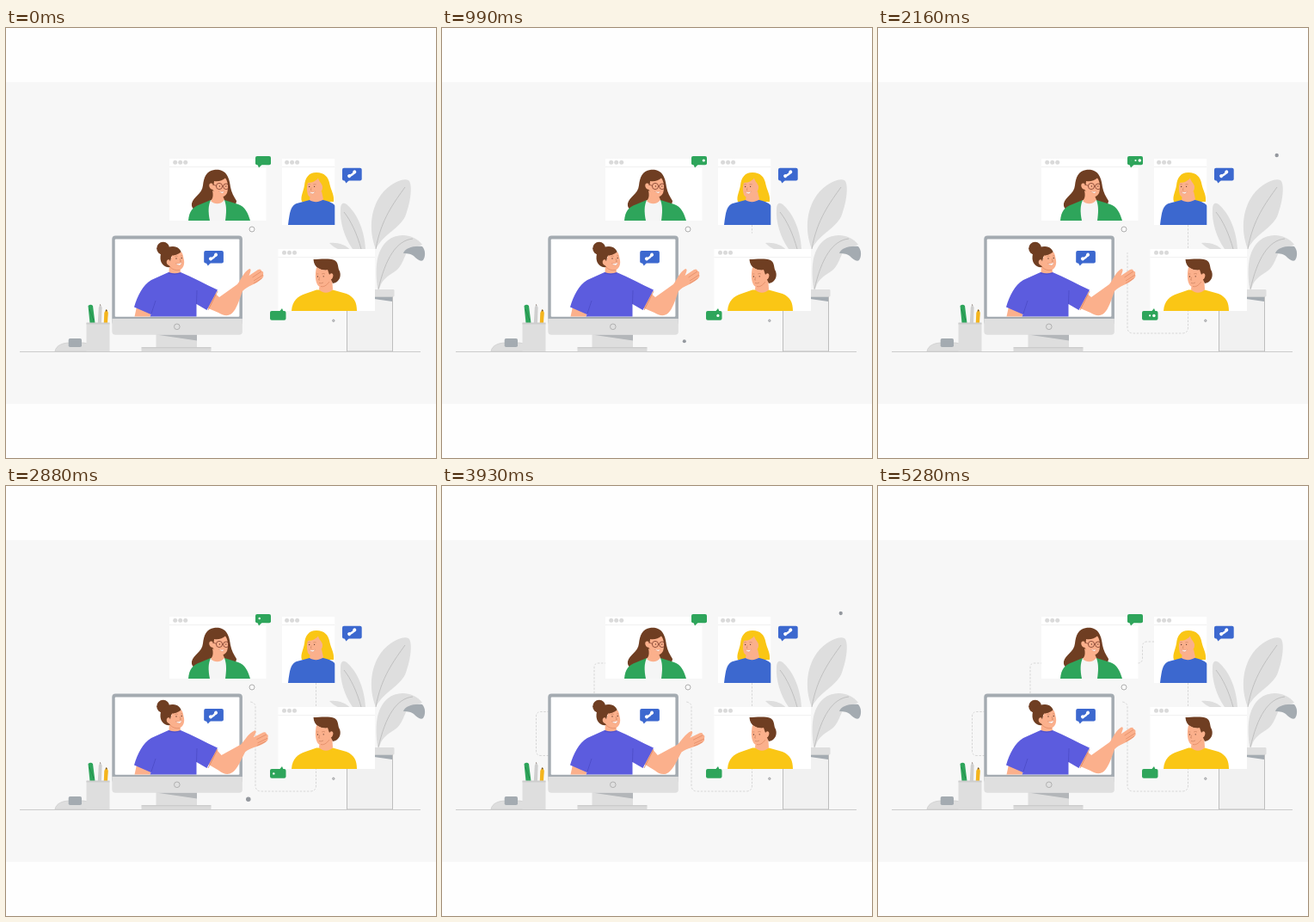
Recreate the animation shown at these times as an HTML page with a canvas. Size 500 px wide and 500 px high, loop 5430 ms.

```html
<!DOCTYPE html>
<html lang="en">
<head>
<meta charset="utf-8">
<title>Video call</title>
<style>
html, body { margin: 0; width: 100%; height: 100%; overflow: hidden; background: #fefefe; }
canvas { display: block; width: 500px; height: 500px; }
</style>
</head>
<body>
<canvas id="stage"></canvas>
<script>
const LOOP = 5430, END = 5280;
const cv = document.getElementById('stage');
const dpr = window.devicePixelRatio || 1;
cv.width = cv.height = 500 * dpr;
const c = cv.getContext('2d');

const SKIN = '#fbb08c', SKIN_LINE = '#d9805c', HAIR = '#6f3e22', GREEN = '#2ea55b',
  BLUE = '#3c68cf', YELLOW = '#fac615', VIOLET = '#5c5cde', GREY = '#dedede',
  STEEL = '#a4abb1', LINE = '#b8b8b8', WHITE = '#fff';

const clamp = x => Math.max(0, Math.min(1, x));
const smooth = x => { x = clamp(x); return x * x * (3 - 2 * x); };
const pulse = x => x > 0 && x < 1 ? Math.sin(Math.PI * x) : 0;

function shape(d, fill, line, w = 1) {
  const p = new Path2D(d);
  if (fill) { c.fillStyle = fill; c.fill(p); }
  if (line) { c.strokeStyle = line; c.lineWidth = w; c.stroke(p); }
}
function box(x, y, w, h, fill, r = 0, line) {
  c.beginPath();
  c.roundRect(x, y, w, h, r);
  if (fill) { c.fillStyle = fill; c.fill(); }
  if (line) { c.strokeStyle = line; c.lineWidth = 1; c.stroke(); }
}
function dot(x, y, r, fill, line, w = 1) {
  if (r <= 0) return;
  c.beginPath();
  c.arc(x, y, r, 0, 7);
  if (fill) { c.fillStyle = fill; c.fill(); }
  if (line) { c.strokeStyle = line; c.lineWidth = w; c.stroke(); }
}

function plant() {
  shape('M403 257C393 243 388 224 389 211C389 204 392 202 396 205C408 215 417 235 418 257Z', GREY);
  shape('M393 214C401 224 408 239 413 257', null, LINE, .8);
  shape('M376 250C386 249 395 252 400 258H388C383 256 379 253 376 250Z', GREY);
  shape('M430 257C422 237 423 212 436 194C446 181 461 174 468 177C473 181 471 201 465 217C459 233 440 238 430 257Z', GREY);
  shape('M464 185C452 202 436 222 430 257', null, LINE, .8);
  shape('M432 303C429 279 430 259 444 247C455 238 474 239 484 252L471 256C463 261 463 273 455 281C447 287 438 290 434 303Z', GREY);
  shape('M462 262C464 256 473 253 484 254C488 258 488 266 485 270C482 272 478 269 474 265C470 262 465 262 462 262Z', STEEL);
  shape('M473 245C454 247 441 268 433 304', null, LINE, .8);
  box(396.5, 312, 53, 64, '#f1f1f1', 0, '#bdbdbd');
  shape('M420 312.5H449V318L428 315Z', STEEL);
  box(392, 304, 59.5, 8.5, GREY, 1);
}

const cable = [
  // path, approximate length, start time, finish time
  ['M360.5 229V348Q360.5 355 353.5 355H297Q290 355 290 348V257Q290 252 284 251', 303, 950, 2240],
  ['M124 313.5H115Q109.5 313.5 109.5 308V268Q109.5 262.5 115 262.5H124', 75, 2950, 3280],
  ['M177 241V211Q177 206 182 206H190', 46, 3700, 3900],
  ['M302 206Q307.5 206 307.5 200V187Q307.5 181 313 181H321', 43, 4450, 4650]
];
function cables(t) {
  c.strokeStyle = '#cdcdcd';
  c.lineWidth = .8;
  for (const [d, len, a, b] of cable) {
    let left = clamp((t - a) / (b - a)) * len;
    if (left <= 0) continue;
    const dash = [];
    while (left > 0) { dash.push(Math.min(2.4, left), 1.7); left -= 4.1; }
    dash[dash.length - 1] = 2 * len;
    c.setLineDash(dash);
    c.stroke(new Path2D(d));
  }
  c.setLineDash([]);
}

function pane(x, y, w, h, dx) {
  box(x, y, w, h, WHITE);
  box(x, y + 9, w, .8, '#ececec');
  for (let i = 0; i < 3; i++) dot(x + dx + i * 6, y + 4.3, 2.5, '#dadada');
}
function eye(x, y) { dot(x, y, .65, '#5b3428'); }
function smile(d) { shape(d, WHITE, '#d5805f', .35); }

function guestGlasses() {
  shape('M242 165C233 166 230 174 229 183C228 193 218 196 216 204C215 212 223 214 231 211H257C264 209 268 205 268 201C265 196 262 191 261 185C260 177 258 170 253 167C250 165 246 164.6 242 165Z', HAIR);
  shape('M212 224C213 213 217 208 226 205L238 200H254L270 205C278 208 281 214 284 224Z', GREEN);
  shape('M238 200L254 200C257 208 256 216 255 224H237C235 214 235 207 238 200Z', '#f5f5f5');
  shape('M240 189C241 194 241 198 238 201C243 206 250 205 254 200L252 195Z', SKIN);
  shape('M242 178C247 179 252 177 255 174.5C258 178 259 186 257 192C254 198 247 198 243.5 193L240.5 188C236 187.5 235 181 238 180.5C240 180 241 182 241.5 183Z', SKIN);
  dot(248, 184, 3.6, null, '#7a3a2a', .8);
  dot(256, 184.3, 3.3, null, '#7a3a2a', .8);
  shape('M244.4 183.3L240 182M251.6 184H252.6', null, '#7a3a2a', .7);
  eye(248.4, 184); eye(255.8, 184);
  smile('M247 189.3Q251 191.5 254 189.8Q252 195 247 189.3Z');
}

function guestBlonde() {
  c.save();
  c.beginPath(); c.rect(321, 152, 61.3, 77); c.clip();
  shape('M361 168C352 168 348 174 347 183C346 190 342 196 344 202H381C382 194 378 189 376.5 182C375 173 370 168 361 168Z', YELLOW);
  shape('M328 229C330 213 331 207 338 204L353 200H369C377 202 381 204 383 207V229Z', BLUE);
  shape('M354 194L353 200C357 203 365 203 369 199L367 190Z', SKIN);
  shape('M351 180C357 180 361 177 363 174.5C364 179 367 180 368 184C368.5 189 366 190 364 193C360 199 353 198 351 194C349.5 189 349.5 184 351 180Z', SKIN);
  eye(352.7, 184.5); eye(358.6, 184.3);
  shape('M351 182Q352.5 181.2 354 182M357.2 182Q359 181.2 360.7 182M355.2 185.5L354.2 188.5H355.5', null, '#c27b58', .5);
  smile('M352.5 190.3Q356 192 359.5 190Q357 195.5 352.5 190.3Z');
  c.restore();
}

function guestMan() {
  shape('M332 329C333 317 339 312 348 309L361 304.5H380L396 309C405 313 408 319 408 329Z', YELLOW);
  shape('M365 295L364 304C368 309 376 309 380 304L379 289Z', SKIN);
  shape('M357.5 269C364 269 376 267.5 382 270C386 272 386 277 387 281C391 287 388 296 380 297L375 286L373 282C366 282 358 279 357.5 269Z', HAIR);
  shape('M361 278C366 281.5 372 282 374 281L376 287C379 283 382 287 379.5 291C378.5 293 377 292.5 376 293C373 299 369 302 364 300.5C359.5 297 359 287 361 278Z', SKIN);
  shape('M366 300.5Q371 302 376 295', null, SKIN_LINE, .6);
  eye(362.4, 289); eye(369.2, 288.8);
  shape('M361 286H363.4M367.2 286Q369 285 371 286M364.7 289.5L363.6 293H365M364 296.5Q366.5 297.4 369 296', null, '#b8714f', .5);
}

function bubble(x, y, w, h, fill, tail) {
  box(x, y, w, h, fill, 2);
  shape(tail, fill);
}
function handset(x, y) {
  c.save();
  c.translate(x, y);
  c.rotate(-.66);
  shape('M-4 .3Q0 1.4 4 .3', null, WHITE, 2.6);
  dot(-3.9, 0, 2, WHITE);
  dot(3.9, 0, 2, WHITE);
  c.restore();
}
function typing(x, y, p) {
  [[.03, .63], [.18, .58], [.33, .66]].forEach(([s, d], i) =>
    dot(x + i * 4.8, y, 1.75 * pulse((p - s) / d), WHITE));
}

function desk() {
  box(16, 376, 466, 1, '#cbcbcb');
  shape('M57 376C58 369 66 366 74 366H90C99 367 103 372 104 376Z', GREY, '#cbcbcb', .7);
  box(72.7, 361, 15.3, 10, STEEL, 1.8);
  shape('M95.5 323Q98.5 320.5 101 323L103.5 343H97.5Z', GREEN);
  shape('M97 327L102 340', null, '#23894a', .8);
  shape('M106.8 343L107.8 325L109.6 321L111.6 325L111 343Z', '#cfcfcf');
  shape('M109 322.6L109.6 321L110.3 322.6Z', '#7b6658');
  shape('M113.8 343L114.3 331L116.8 327L118.8 331L118 343Z', '#f4b51d');
  shape('M115.4 329.3L116.8 327L117.9 329.3Z', '#6b5134');
  box(93.5, 343, 27, 33, GREY);
  box(93.5, 342.5, 27, 2, '#cdcdcd');
}

function monitor() {
  box(174.5, 356, 47.5, 15.5, GREY);
  shape('M174.5 356.5H222V363.5Z', '#b3b6b9');
  box(157.5, 371.5, 81, 4.7, '#dadada', 1);
  box(157.5, 371.3, 81, .9, '#c4c4c4');
  box(123.3, 241.6, 151.6, 104, STEEL, 4);
  box(126.7, 245.4, 144.7, 90.4, WHITE, 1);
  box(123.3, 338, 151.6, 18.7, '#dfdfdf', [0, 0, 4, 4]);
  dot(198.8, 347.3, 3.3, null, '#ababab', .9);
}

function forearm(turn) {
  c.save();
  c.translate(250, 334);
  c.rotate(turn);
  c.translate(-250, -334);
  shape('M240 306L248 313L269 298C273 293 276 284 283 280Q285.5 280 284 284L282.5 288L293 281Q296.5 279.5 297 282.5Q300 283 299 286.5Q300.5 289 297 292C291 298 280 300 275 306C271 317 268 327 263 331.5C258 336 252 334 247 331L233 325Z', SKIN);
  shape('M297 283L286.5 290M299 287L288 294M297.5 291L288 297', null, SKIN_LINE, .6);
  c.restore();
}

function host(turn) {
  shape('M152 324L169 330L167.5 335.5H149.5Z', SKIN);
  forearm(turn);
  shape('M189 284Q196 281.5 203 284C217 290 232 298 246 304.5L233.5 328L221.5 321V335.5H167.5L168.5 333L149 324.5C153 311 159 299 169 293Z', VIOLET);
  shape('M169 332L174 317M221.5 321L222 305M189 285Q196 287.5 203 285', null, '#4545bd', .6);
  shape('M246 306L235 328', null, SKIN_LINE, .8);
  shape('M190 274L189.5 284Q196 286.5 203 284L202 276Z', SKIN);
  dot(182.7, 256.2, 7.5, HAIR);
  shape('M179.5 268C179 259 186 254 194 254C200 254 204 258 204 263L192 266L191 278C184 279 180 274 179.5 268Z', HAIR);
  shape('M193 264.5C198 264.5 201 262 204 260.5C206 263 206 266 207 270C208 276 205 282 199 282C194 281 191 278 189.5 276C185.5 275 186 268 190 269.5L191 271.5Z', SKIN);
  shape('M191 278Q195 282.5 202 281.5', null, SKIN_LINE, .6);
  eye(198, 268); eye(204.2, 267.5);
  shape('M196.3 265.7Q198 264.6 199.8 265.4M203 265L205 264.8M202 268.3L203.3 271.4H201.9', null, '#b8714f', .5);
  smile('M197 273.5Q201 275 204.5 272.6Q203 279 197 273.5Z');
}

// Lowers briskly, then eases back up more slowly.
function wave(t) {
  const p = t % 1080 / 1080;
  if (p < .33) return smooth(p / .33);
  return 1 - smooth((p - .33) / .6) ** 2;
}

function draw(t) {
  t = Math.min(t, END);
  c.setTransform(dpr, 0, 0, dpr, 0, 0);
  box(0, 0, 500, 500, '#fefefe');
  box(0, 63, 500, 374, '#f7f7f7');
  plant();
  cables(t);

  pane(190, 152, 112.5, 72, 6.7);
  guestGlasses();
  pane(321, 152, 61.3, 77, 5.6);
  guestBlonde();
  pane(316.5, 257, 112.5, 72, 7);
  guestMan();

  desk();
  monitor();
  host(.185 * wave(t));

  const p = t % 1320 / 1320;
  bubble(290, 149, 18, 10.3, GREEN, 'M292.5 159L294 162.5L297.5 159Z');
  typing(294.7, 154, p);
  bubble(307, 329, 18.5, 10.7, GREEN, 'M318 329.5L321 326L322.5 329.5Z');
  typing(311.3, 334.4, p);
  bubble(391, 162.7, 22.7, 14.7, BLUE, 'M393.5 177L395.5 180.5L399 177Z');
  handset(402.2, 169.7);
  bubble(230.2, 259, 22.7, 14.5, BLUE, 'M232.7 273L234.8 276.5L238 273Z');
  handset(241, 266);

  const q = t % 1760 / 1760;
  dot(286, 234, 3, '#fafafa', '#a6a6a6', .9);
  dot(380.8, 340.3, 1.2, '#ddd', '#8c8f94', .8);
  dot(463.7, 148, 2.4 * pulse(q / .36), '#94989e');
  dot(281.8, 364.2, 2.8 * pulse((q - .46) / .4), '#94989e');
}

const start = performance.now();
function tick() {
  draw((performance.now() - start) % LOOP);
  requestAnimationFrame(tick);
}
tick();
</script>
</body>
</html>
```
